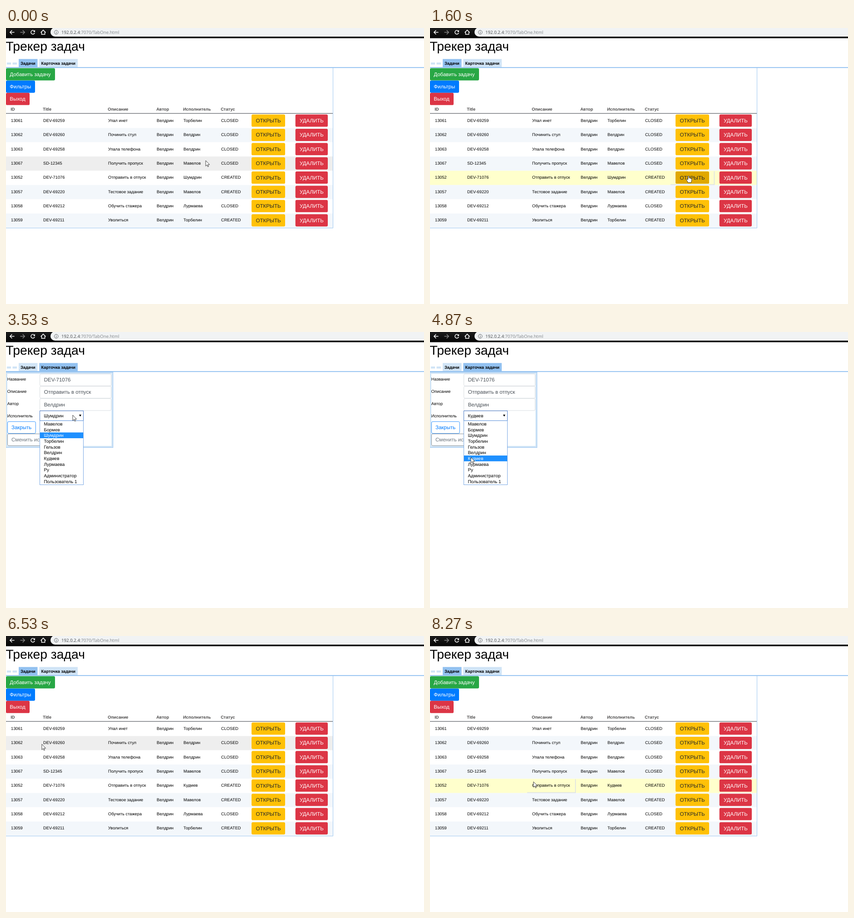
Write an HTML page that moves like this. It is 921 px wide and 608 px high and loops after 8410 ms.

```html
<!DOCTYPE html>
<html lang="ru">
<head>
<meta charset="utf-8">
<title>Трекер задач</title>
<style>
html, body { margin: 0; width: 100%; height: 100%; overflow: hidden; background: #fff; }
svg { display: block; font-family: "Liberation Sans", Arial, sans-serif; text-rendering: geometricPrecision; }
text { white-space: pre; }
</style>
</head>
<body>
<svg id="stage" width="921" height="608" viewBox="0 0 921 608">
  <defs>
    <linearGradient id="dark" x2="0" y2="1">
      <stop stop-color="#1c1c1c"/><stop offset="1" stop-color="#050505"/>
    </linearGradient>
  </defs>
  <rect width="921" height="22.5" fill="url(#dark)"/>
  <path d="M921 -1H108a10 10 0 0 0 0 20H921Z" fill="#f1f3f4"/>
  <g fill="none" stroke="#fff" stroke-width="1.5">
    <path d="M18.5 9.5H9M13.3 5 8.8 9.5 13.3 14"/>
    <path d="M31.5 9.5H41M36.7 5 41.2 9.5 36.7 14" stroke="#858585"/>
    <path d="M62.3 6.6A4.2 4.2 0 1 0 63.2 10.6"/>
    <path d="M64 4.5V8.7H59.8Z" fill="#fff" stroke="none"/>
    <path d="M76.5 10 82 4.6 87.5 10M78.4 8.8V14H85.6V8.8"/>
  </g>
  <circle cx="110.7" cy="9.4" r="4.3" fill="none" stroke="#5f6368"/>
  <path d="M110.7 8.8V12M110.7 6.7V7.8" stroke="#5f6368" stroke-width="1.1"/>
  <text x="122" y="13" font-size="9.7" fill="#808589" style="font-family:'Open Sans',sans-serif"><tspan fill="#45484b">192.0.2.4</tspan>:7070/TabOne.html</text>
  <text x="-.4" y="50.4" font-size="28.3">Трекер задач</text>
  <g id="page"></g>
</svg>
<script>
const LOOP = 8410, STEP = 1000 / 15, PITCH = 31.37, TOP = 189;
const page = document.getElementById('page');

const AUTHOR = 'Велдрин', OLD = 'Шумдрин', NEW = 'Кудмев';
const people = ['Мавелов', 'Бормев', OLD, 'Торбелин', 'Гельзов', AUTHOR, NEW,
  'Лурмаева', 'Ру', 'Администратор', 'Пользователь 1'];
const tasks = [
  ['13061', 'DEV-69259', 'Упал инет', 'Торбелин', 'CLOSED'],
  ['13062', 'DEV-69260', 'Починить стул', AUTHOR, 'CLOSED'],
  ['13063', 'DEV-69258', 'Упала телефона', AUTHOR, 'CLOSED'],
  ['13067', 'SD-12345', 'Получить пропуск', 'Мавелов', 'CLOSED'],
  ['13052', 'DEV-71076', 'Отправить в отпуск', '', 'CREATED'],
  ['13057', 'DEV-69220', 'Тестовое задание', 'Мавелов', 'CREATED'],
  ['13058', 'DEV-69212', 'Обучить стажера', 'Лурмаева', 'CLOSED'],
  ['13059', 'DEV-69211', 'Уволиться', 'Торбелин', 'CREATED']
];
const heads = ['ID', 'Title', 'Описание', 'Автор', 'Исполнитель', 'Статус'];
const cols = [11, 82, 225, 332, 391, 474];

// Pointer legs: first step, last step, target x, y
const home = [440, 292];
const legs = [
  [6, 17, 567, 325], [35, 48, 147, 183], [56, 70, 90, 276],
  [77, 89, 77.5, 238], [97, 110, 201, 260], [110, 122, 228, 321]
];

const ease = p => p < .5 ? 2 * p * p : 1 - 2 * (1 - p) * (1 - p);

function pointer(n) {
  let [x, y] = home;
  for (const [a, b, tx, ty] of legs) {
    if (n <= a) break;
    const p = ease(Math.min(1, (n - a) / (b - a)));
    x += (tx - x) * p;
    y += (ty - y) * p;
  }
  return { x, y };
}

const rect = (x, y, w, h, fill, more = '') =>
  `<rect x="${x}" y="${y}" width="${w}" height="${h}" fill="${fill}" ${more}/>`;
const text = (x, y, s, size = 9.25, fill = '#000', more = '') =>
  `<text x="${x}" y="${y}" font-size="${size}" fill="${fill}" ${more}>${s}</text>`;
const bold = 'font-weight="700"';
const line = (d, color, w = 1) => `<path d="${d}" fill="none" stroke="${color}" stroke-width="${w}"/>`;
const button = (x, y, w, label, fill, pad = 9, ink = '#fff') =>
  rect(x, y, w, 27, fill, 'rx="2.9"') + text(x + pad, y + 17.5, label, 11.5, ink);
const outlined = (x, y, w, label, color) =>
  rect(x + .4, y + .4, w - .8, 26, '#fff', `rx="2.7" stroke="${color}" stroke-width=".8"`) +
  text(x + 9, y + 17.3, label, 11.5, color);

function tabs(card) {
  const tint = on => on ? '#92c1f0' : '#d0e4f6';
  return rect(2, 76, 9, 4.5, tint()) + rect(14.5, 76, 9.5, 4.5, tint()) +
    rect(28, 68.3, 41.5, 18.2, tint(!card)) + text(32, 80.6, 'Задачи', 9.25, '#000', bold) +
    rect(73.3, 68.3, 84.7, 18.2, tint(card)) + text(77.6, 80.6, 'Карточка задачи', 9.25, '#000', bold) +
    rect(0, 86.2, 921, 1.9, '#92c1f0');
}

function list({ hover, picked, cell, worker, open }) {
  let s = button(0, 88.5, 108, 'Добавить задачу', '#28a745', 8.3) +
    button(0, 115.7, 64, 'Фильтры', '#007bff', 8.3) +
    button(0, 142.8, 52, 'Выход', '#dc3545', 8.3);
  heads.forEach((h, i) => s += text(cols[i] - .8, 182, h, 9.25, '#4b4a4a', bold));
  tasks.forEach(([id, title, about, who, state], i) => {
    const y = TOP + PITCH * i;
    const fill = i === picked ? '#ffffcc' : i === hover ? '#eeeeee' : i % 2 ? '#f3f7fb' : '#fff';
    s += rect(0, y, 720, PITCH, fill);
    if (i === picked) {
      const [l, r] = cell;
      s += line(`M${l} ${y + 30.8}H${r}V${y + 1}`, '#d7dde8', 1.4);
    }
    [id, title, about, AUTHOR, who || worker, state].forEach((v, c) => s += text(cols[c], y + 17.9, v));
    s += button(541, y + 1.6, 74, 'ОТКРЫТЬ', i === 4 && open || '#ffc107', 9.5, '#212529') +
      button(637.7, y + 1.6, 71.3, 'УДАЛИТЬ', '#dc3545', 9.2);
  });
  return s + rect(0, 187.5, 720, 1.4, '#6f7277') + line('M0 440.7H720.5V88', '#92c1f0', .9);
}

function card({ worker, edge, press, ring, shift }) {
  let s = rect(-.5, 88.4, 236.3, 166.2, '#d0e4f6', 'stroke="#92c1f0" stroke-width=".9"') +
    rect(2.8, 92, 229.6, 159, '#fff');
  ['Название', 'Описание', 'Автор', 'Исполнитель'].forEach((l, i) => s += text(2.8, 107 + 27.1 * i, l));
  ['DEV-71076', 'Отправить в отпуск', AUTHOR].forEach((v, i) => {
    const y = 92.4 + 27.1 * i;
    s += rect(74.6, y, 157, 26.4, '#fff', 'rx="2.7" stroke="#ced4da" stroke-width=".8"') +
      text(83.7, y + 16.9, v, 11.5, '#495057');
  });
  s += rect(74.5, 173.7, 96, 21.6, '#fff', `stroke="${edge}" stroke-width="1"`) +
    text(83.4, 187.8, worker, 10) + '<path d="M161 182h5l-2.5 4.4Z"/>' +
    outlined(3, 197, 62.7, 'Закрыть', '#007bff');
  if (ring) s += rect(1.9, 222.9, 138.8, 29.2, 'none', 'rx="4" stroke="#6c757d" stroke-opacity=".5" stroke-width="2.3"');
  s += press ? button(3, 224, 136.6, 'Сменить исполнителя', '#6c757d') :
    outlined(3, 224, 136.6, 'Сменить исполнителя', '#6c757d');
  return `<g transform="translate(${shift})">${s}</g>`;
}

function options(active, opacity) {
  let s = rect(74.5, 195.5, 96, 141, '#fff', 'stroke="#6c9fe0" stroke-width=".9"');
  people.forEach((p, i) => {
    const y = 195.9 + 12.7 * i;
    if (i === active) s += rect(75, y, 95, 12.7, '#1e90ff');
    s += text(83.4, y + 9.9, p, 10, i === active ? '#fff' : '#000');
  });
  return `<g opacity="${opacity}">${s}</g>`;
}

const ARROW = 'M0 0V12.2L2.8 9.6 4.6 13.7 6.4 13 4.6 9H8.6Z';
const HAND = 'M-1.2 8.5V1Q0-.6 1.2 1V5Q2.4 4.2 3.4 5.4 4.6 4.8 5.4 6 6.8 5.6 7 7.2V10.5Q6.6 12.5 5.6 15H-1.2Q-1.8 12.5-4.4 9-4.6 7.4-3 7.7Z';
const cursor = ({ x, y }, hand) =>
  `<path transform="translate(${hand ? x + 2.5 : x} ${hand ? y + .6 : y})" d="${hand ? HAND : ARROW}" fill="#fff" stroke="#222" stroke-width=".85"/>`;

function scene(n) {
  const at = pointer(n);
  const onCard = n >= 29 && n < 91;
  let hand = false, body;
  if (onCard) {
    const press = n > 77 && at.y < 251;
    const over = at.x > 74 && at.x < 171 && at.y > 173 && at.y < 195;
    const focus = n >= 49 && n < 90;
    hand = n === 29 || press && n < 90;
    body = card({
      worker: n < 73 ? OLD : NEW,
      edge: focus ? '#4a7ac8' : over ? '#777' : '#a9a9a9',
      press, ring: n === 90, shift: n === 90 ? 157 : 0
    });
    if (n >= 50 && n < 74) {
      const active = at.y > 196 ? Math.floor((at.y - 195.9) / 12.7) : 2;
      body += options(active, [.35, .65, .85][n - 50] || 1);
    }
  } else {
    const row = Math.floor((at.y - TOP) / PITCH);
    const first = n < 29;
    hand = first && row === 4 && at.x > 541;
    body = list({
      hover: n === 91 ? -1 : row,
      picked: n >= 124 || first && n >= 24 ? 4 : -1,
      cell: first ? [530, 626.3] : [214, 320.5],
      worker: first ? OLD : NEW,
      open: hand && (n === 25 ? '#d39e00' : '#e0a800')
    });
  }
  return tabs(onCard && n < 90) + body + cursor(at, hand);
}

const start = performance.now();
let shown = -1;
function tick() {
  const t = (performance.now() - start) % LOOP;
  const n = Math.floor((t + 4) / STEP);
  if (n !== shown) page.innerHTML = scene(shown = n);
  requestAnimationFrame(tick);
}
tick();
</script>
</body>
</html>
```
